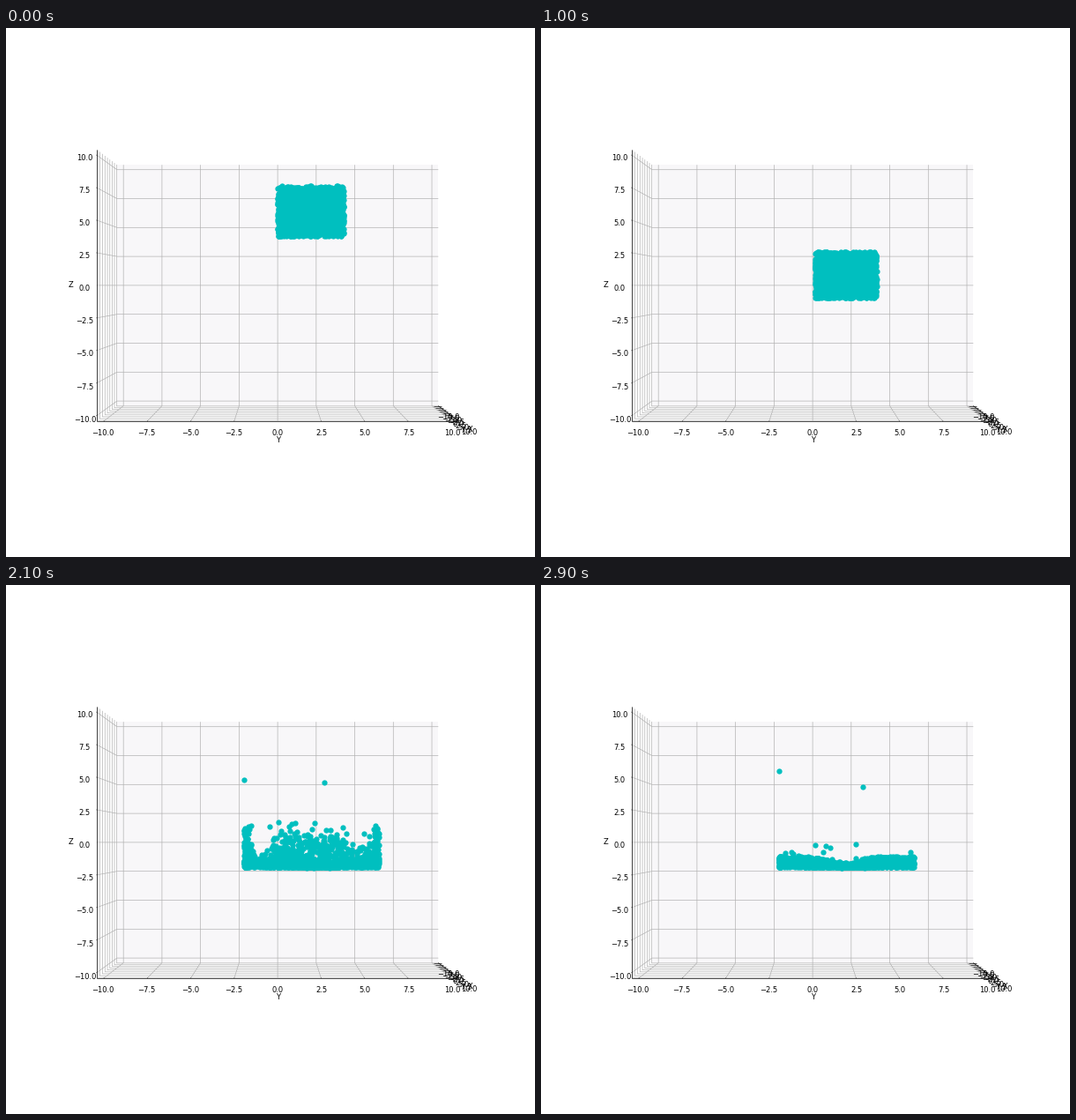
These frames come from a looping animation (600 by 600 pixels, 3000 ms). A matplotlib script:

```python
import numpy as np
import matplotlib.pyplot as plt
from matplotlib.animation import FuncAnimation
from matplotlib.collections import LineCollection

SIZE, DPI = 600, 60
FRAMES, INTERVAL = 30, 100
COUNT = 2000
GRAVITY = 0.098          # units per frame squared
FLOOR, MID = -2.0, 2.0   # tank floor, tank centre in x and y
HALF = 2.0               # half size of the falling cube
REBOUND = 14             # frame at which the pile springs back
EDGE = 10 + 20 / 48      # half size of the axes box

plt.rcParams["font.family"] = "DejaVu Sans"
fig = plt.figure(figsize=(SIZE / DPI, SIZE / DPI), dpi=DPI, facecolor="white")
ax = fig.add_axes((0, 0, 1, 1))
ax.set_xlim(0, SIZE)
ax.set_ylim(SIZE, 0)
ax.axis("off")


def project(x, y, z):
    """Perspective view along the x axis, in pixels."""
    depth = 10 - 0.4 / 7 * np.asarray(x, float)
    return 308.1 + 185.33 * y / depth, 291.9 - 139.0 * z / depth


def path(*points):
    return [project(*p) for p in points]


def draw_lines(paths, color, snap=None):
    lines = LineCollection(paths, colors=color, linewidths=0.8, zorder=2)
    lines.set_snap(snap)
    ax.add_collection(lines)


def put_text(point, text, va):
    px, py = project(*point)
    ax.text(px, py - 0.6, text, fontsize=10, ha="center", va=va, zorder=3)


def draw_axes():
    e = EDGE
    ticks = np.arange(-10, 10.1, 2.5)
    corners = path((-e, -e, -e), (-e, e, -e), (-e, e, e), (-e, -e, e))
    ax.add_patch(plt.Polygon(corners, facecolor="#f8f7f9", edgecolor="none", zorder=1))

    grid, marks = [], []
    inner, outer = e - 1 / 3, e + 1 / 6
    tick_gap, name_gap = e + 0.639, e + 1.389
    for t in ticks:
        grid.append(path((t, -e, e), (t, -e, -e), (t, e, -e)))
        grid.append(path((e, t, -e), (-e, t, -e), (-e, t, e)))
        grid.append(path((-e, e, t), (-e, -e, t), (e, -e, t)))
        marks.append(path((t, inner, -e), (t, outer, -e)))
        marks.append(path((inner, t, -e), (outer, t, -e)))
        marks.append(path((inner, -e, t), (outer, -e, t)))
        text = f"{t:.1f}".replace("-", "\u2212")
        put_text((t, tick_gap, -tick_gap), text, "top")
        put_text((tick_gap, t, -tick_gap), text, "top")
        put_text((tick_gap, -tick_gap, t), text, "top")

    draw_lines(grid, "#b0b0b0", snap=False)
    draw_lines(marks, "black")
    draw_lines([path((-e, e, -e), (e, e, -e)),
                path((e, -e, -e), (e, e, -e)),
                path((e, -e, -e), (e, -e, e))], "black")
    put_text((0, name_gap, -name_gap), "X", "center")
    put_text((name_gap, 0, -name_gap), "Y", "center")
    put_text((name_gap, -name_gap, 0), "Z", "center")


rng = np.random.default_rng(7)
dx, dy, dz = rng.uniform(-HALF, HALF, (3, COUNT))


def spread(offset):
    """Resting place of a particle, -1 to 1 between the walls."""
    wall = 1 - 0.03 * np.abs(rng.normal(size=COUNT))
    return np.clip(offset / HALF * rng.uniform(0.4, 1.7, COUNT), -wall, wall)


ex, ey = spread(dx), spread(dy)
off = np.abs(ey)
drift = rng.normal(0, 0.03, COUNT)
dz[:2] = -HALF

fall_height = 7.95 + 0.92 * dz
land = (np.sqrt(0.022 ** 2 + 2 * GRAVITY * fall_height) - 0.022) / GRAVITY
launch = np.maximum(REBOUND, land)

# Fast in the middle and along the walls, slow between; few are near the top speed.
top_speed = 0.9 - 0.4 * np.exp(-((off - 0.76) / 0.16) ** 2)
speed = top_speed * (1 - rng.uniform(0, 1, COUNT) ** (1 / (2.4 - off ** 2)))

level = rng.beta(1, 1.5, COUNT)
rest = 0.3 + 0.6 * np.clip((off - 0.1) / 0.4, 0, 1)

# Two jets outrun the rest: one at the left wall, one near the middle.
ex[:2] = 1
ey[:2] = -1, 0.14
drift[:2] = 0, 0.024
launch[:2] = 13, 12.3
speed[:2] = 1.26, 1.2


def particles(n):
    shrink = 1 - 0.007 * np.minimum(n, land)
    moved = np.clip((n - land) / 3.7, 0, 1)
    x = MID + shrink * dx * (1 - moved) + 4 * ex * moved
    y = MID + shrink * dy * (1 - moved) + 4 * ey * moved

    t = np.maximum(0, n - launch)
    y = np.clip(y + drift * np.minimum(t, 2 * speed / GRAVITY), -2, 6)

    falling = np.maximum(FLOOR, 5.97 + shrink * dz - 0.022 * n - GRAVITY / 2 * n * n)
    bounce = speed * t - GRAVITY / 2 * t * t
    settled = level * rest * np.clip((n - land) / 12, 0, 1)
    squeeze = np.exp(-((n - REBOUND) / 1.5) ** 2)
    heap = level * squeeze * np.clip(2.2 - np.abs(y - MID), 0, 1)
    height = np.maximum(np.maximum(settled, heap), bounce)
    return project(x, y, np.where(n < land, falling, FLOOR + height))


draw_axes()
dots, = ax.plot([], [], "o", color=(0, 0.75, 0.75), markersize=6,
                markeredgewidth=1.5, zorder=4)


def update(n):
    dots.set_data(*particles(n))
    return (dots,)


anim = FuncAnimation(fig, update, frames=FRAMES, interval=INTERVAL,
                     repeat=True, repeat_delay=0)
plt.show()
```
